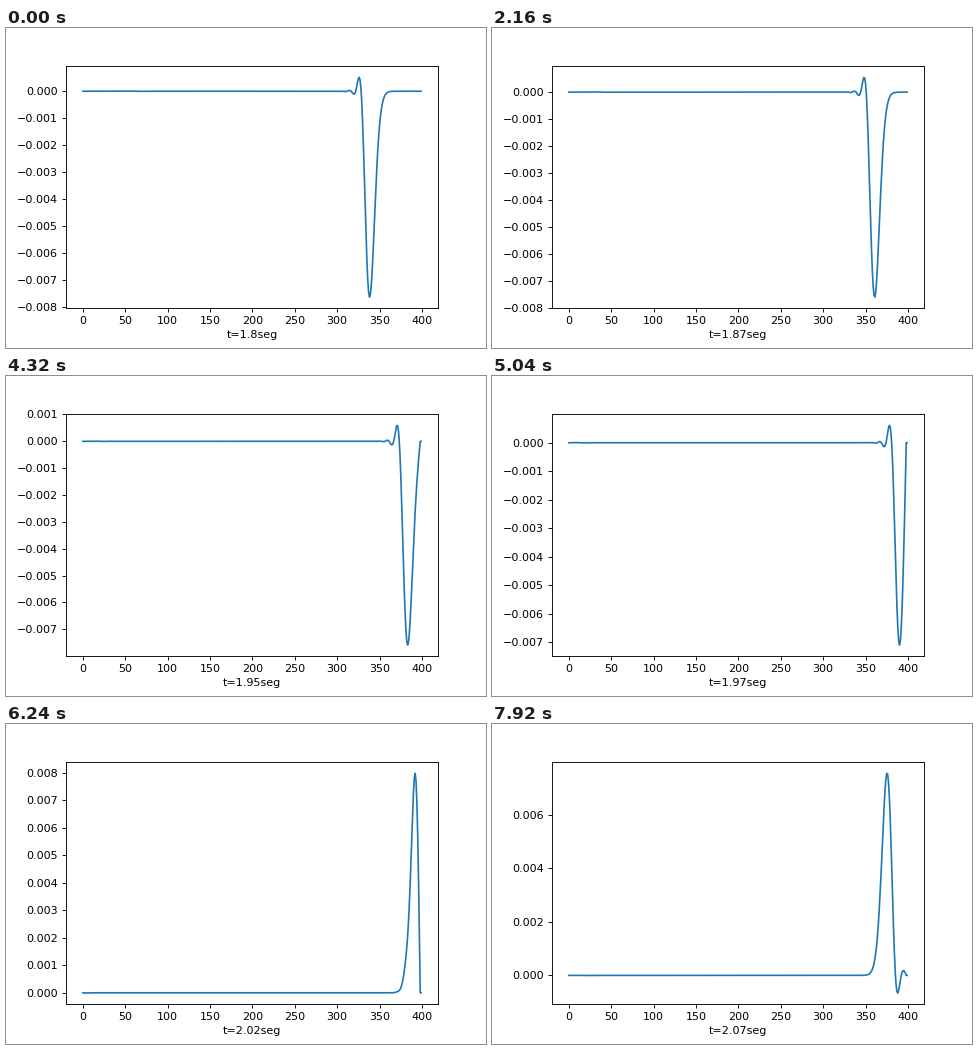
A matplotlib script for the animation above (8 s loop, 480 by 320 pixels).

```python
import numpy as np
import matplotlib.pyplot as plt
from matplotlib.animation import FuncAnimation

N = 400             # grid points
WALL = 398          # right fixed end
COURANT = 0.5
DT = 1 / 600
START = 1080        # solver steps before the first view
PER_VIEW = 5        # solver steps between views
VIEWS = 34
HOLD = 3            # ticks each view stays
TICKS = 100
AMP, CENTER, SIGMA = 0.0079, 200, 5

x = np.arange(N)


def pulse(shift):
    u = AMP * np.exp(-((x - CENTER + shift) / SIGMA) ** 2 / 2)
    u[0] = u[WALL:] = 0
    return u


def solve():
    """Leapfrog wave on a string with fixed ends, pulse sent to the left."""
    prev, cur = pulse(0), pulse(COURANT)
    views = []
    for step in range(1, START + PER_VIEW * VIEWS):
        if step >= START and (step - START) % PER_VIEW == 0:
            views.append(cur)
        nxt = np.zeros(N)
        bend = cur[2:WALL + 1] - 2 * cur[1:WALL] + cur[:WALL - 1]
        nxt[1:WALL] = 2 * cur[1:WALL] - prev[1:WALL] + COURANT ** 2 * bend
        prev, cur = cur, nxt
    return views


views = solve()

fig, ax = plt.subplots(figsize=(6, 4), dpi=80)
fig.subplots_adjust(left=0.125, right=0.9, bottom=0.125, top=0.88)
line, = ax.plot(x, views[0])


def update(tick):
    n = min(tick // HOLD, VIEWS - 1)
    t = (START + n * PER_VIEW) * DT - 1e-9
    line.set_ydata(views[n])
    ax.relim()
    ax.autoscale_view()
    ax.set_xlabel(f"t={round(t, 2)}seg")
    return line,


def init():
    return update(0)


anim = FuncAnimation(fig, update, frames=TICKS, init_func=init,
                     interval=80, repeat=True, repeat_delay=0, blit=False)
plt.show()
```
